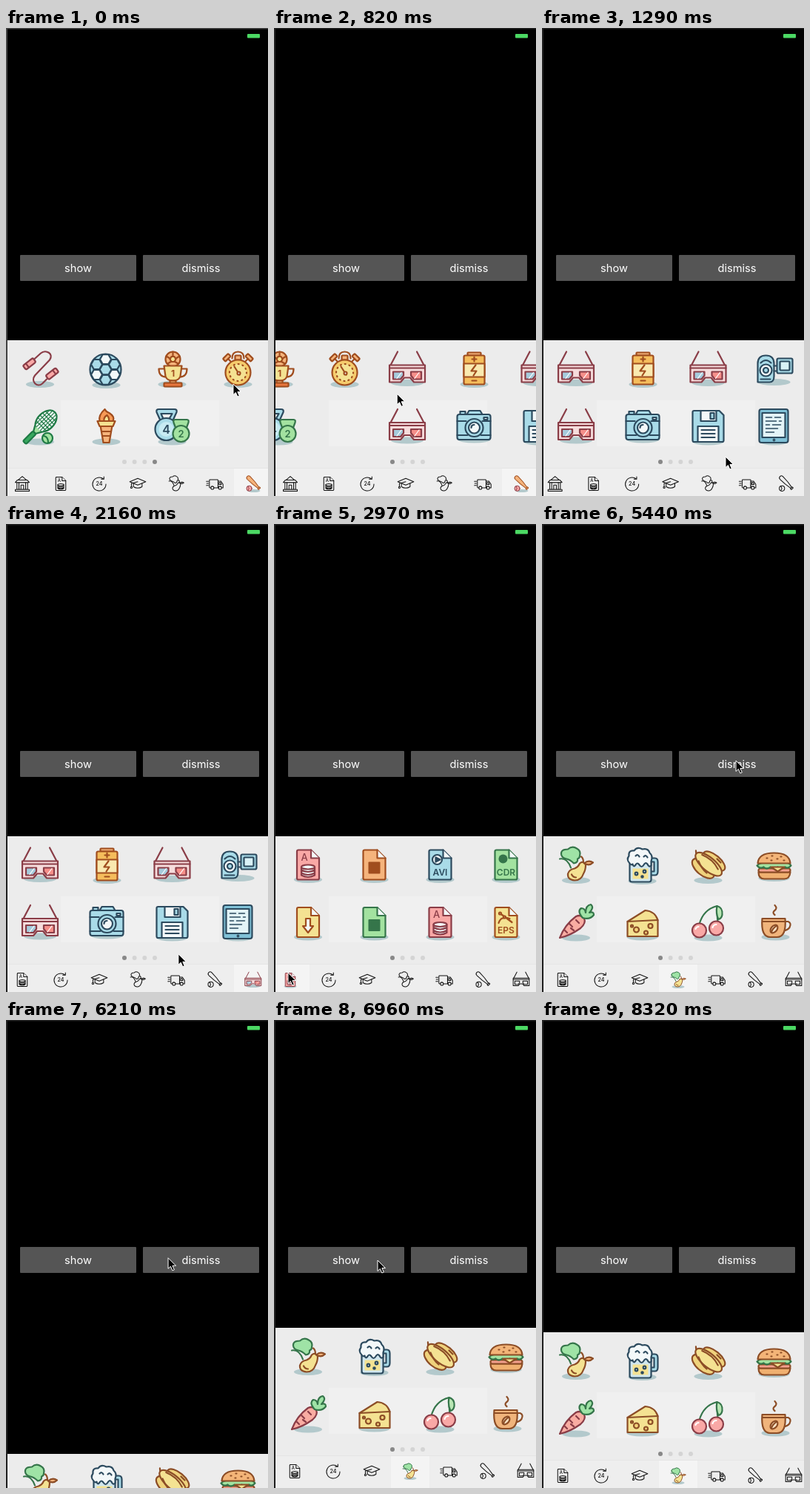
Recreate the animation shown at these times as an HTML page. Size 354 by 631 pixels, loop 8.42 s.

```html
<!DOCTYPE html>
<html lang="en">
<head>
<meta charset="utf-8">
<title>Sticker keyboard</title>
<style>
html, body { margin: 0; width: 100%; height: 100%; overflow: hidden; background: #000; }
svg { display: block; width: 100%; height: 100%; font-family: Inter, Roboto, sans-serif; }
.art { stroke-width: 2.2; stroke-linejoin: round; stroke-linecap: round; }
.mono * { stroke: #111; stroke-width: 2.3; }
.mono :not([fill=none]):not(text) { fill: #eee; }
.mono .sh { display: none; }
.mono text { fill: #111; stroke: none; }
</style>
</head>
<body>
<svg id="stage" viewBox="0 0 354 631"></svg>
<script>
const LOOP = 8420;
const INK = '#2c4a5e', RED = '#8a3d47', RUST = '#a04d1e', BROWN = '#8c4d26', LEAF = '#35754a';
const SKY = '#a9dbe8', PINK = '#f9a8a6', PEACH = '#f5b47c', LIME = '#a3e2a0', SUN = '#f4e292', PALE = '#f3f8f9';

// Shape helpers
const s = col => `stroke="${col}"`;
const p = (d, f = 'none', x = '') => `<path d="${d}" fill="${f}" ${x}/>`;
const c = (x, y, r, f = 'none', e = '') => `<circle cx="${x}" cy="${y}" r="${r}" fill="${f}" ${e}/>`;
const el = (x, y, a, b, f = 'none', e = '') => `<ellipse cx="${x}" cy="${y}" rx="${a}" ry="${b}" fill="${f}" ${e}/>`;
const r = (x, y, w, h, f = 'none', rx = 0, e = '') =>
  `<rect x="${x}" y="${y}" width="${w}" height="${h}" rx="${rx}" fill="${f}" ${e}/>`;
const txt = (x, y, size, str, f, w = 600) =>
  `<text x="${x}" y="${y}" font-size="${size}" font-weight="${w}" text-anchor="middle" fill="${f}" stroke="none">${str}</text>`;
const g = (tr, body, x = '') => `<g transform="${tr}" ${x}>${body}</g>`;
const icon = (col, body, sx = 0, sy = 21, sw = 19) =>
  `<g ${s(col)}>${el(sx, sy, sw, 4.5, '#b3c9cc', 'class="sh" stroke="none"')}${body}</g>`;

const hex = (x, y, a, f) => p('M' + [0, 1, 2, 3, 4, 5].map(i =>
  (x + a * Math.cos(i * Math.PI / 3)).toFixed(1) + ' ' + (y + a * Math.sin(i * Math.PI / 3)).toFixed(1)).join('L') + 'Z', f);
const ball = (x, y, R, f) => c(x, y, R, f) + hex(x, y, R * .38, f) +
  [0, 1, 2, 3, 4, 5].map(i => {
    const a = (i + .5) * Math.PI / 3;
    return hex(x + R * .66 * Math.cos(a), y + R * .66 * Math.sin(a), R * .36, i % 2 ? f : PALE);
  }).join('');

const doc = (col, f, body) => icon(col, p('M-13-20H4L15-9V18Q15 20 13 20H-13Q-15 20-15 18V-18Q-15-20-13-20Z', f) +
  p('M4-20V-9H15', PALE) + body, 0, 20, 19);
const stack = p('M-9 3V14Q0 19 9 14V3M-9 7Q0 12 9 7M-9 11Q0 16 9 11', PALE) + el(0, 3, 9, 3, PALE);

// Sports
const rope = icon(RED, p('M-9-12L1-21C8-27 19-20 13-12L-7 9C-13 17-4 26 3 20L9 14') +
  g('translate(-14 -7) rotate(-38)', r(-9, -3.5, 17, 7, PINK, 2) + p('M-4-3V3')) +
  g('translate(16 7) rotate(-38)', r(-8, -3.5, 17, 7, PINK, 2) + p('M4-3V3')));
const football = icon(INK, ball(-1, 1, 21, SKY), 0, 22);
const trophy = icon(RUST, c(1, -13, 10, PEACH) + hex(1, -13, 4, SUN) + p('M1-23V-17M-8-17L-3-14M10-17L5-14M-6-7L-1-10M8-7L3-10') +
  p('M-9 0H-18Q-18 11-8 11M11 0H20Q20 11 10 11') +
  p('M-11-4H13L11 10Q9 16 1 16T-9 10Z', SUN) + r(-3, 16, 8, 4, PEACH) + r(-11, 19, 24, 5, '#e8773e', 1) +
  txt(1, 10, 12, '1', RUST, 700));
const watch = icon(RUST, p('M-8-14Q-8-23 0-23T8-14') + r(-4, -18, 8, 6, PEACH, 1) +
  g('rotate(-45)', r(-5, -24, 10, 5, PEACH, 1) + p('M0-19V-13')) +
  g('rotate(45)', r(-5, -24, 10, 5, PEACH, 1) + p('M0-19V-13')) +
  c(0, 5, 17, '#f5cb6c') + c(0, 5, 11.5, SUN, 'stroke-dasharray="1 5"') + p('M-5-3L2 8') + c(1, 6, 2, PALE));
const racket = icon('#1f7a45', g('translate(8 -7) rotate(45)', el(0, 0, 11.5, 17, PALE) +
  p('M-7-12V12M-3.5-15V15M0-16V16M3.5-15V15M7-12V12M-9-9H9M-11-4.5H11M-11 0H11M-11 4.5H11M-9 9H9', 'none', 'stroke-width="1.2"') +
  p('M-6 15L-2 22H2L6 15', LIME) + r(-3, 22, 6, 19, '#38a85e', 2)) + c(10, 16, 7, LIME) + p('M5 13Q11 14 11 22'));
const torch = icon(RUST, p('M-9-7Q-11-15-2-23Q0-19 4-18Q12-13 9-7Z', '#f79a56') + p('M-3-7Q-4-12 1-15Q5-10 3-7Z', SUN) +
  p('M-8-1H8L4 22H-4Z', PEACH) + p('M-12-7H12L9 0H-9Z', SUN) + p('M-6 7H6M-5 13H5'));
const bells = icon(INK, p('M-16-8L-21-19Q-22-23-18-23H3Q7-23 6-19L1-8', SKY) + p('M-12-10L-15-17H0L-4-10', '#eee') +
  c(-8, 4, 15, SKY) + c(-8, 4, 10, '#c8ebf3', 'stroke="none"') + txt(-8, 10, 16, '4', INK) +
  `<g ${s(LEAF)}>${p('M5 3L2-5Q1-9 4-9H20Q23-9 22-5L19 3', LIME) + c(12, 10, 11, LIME)}</g>` + txt(12, 15, 13, '2', LEAF));
const bat = icon(RUST, g('translate(2 -2) rotate(45)', p('M-28 0Q-28-6-22-6L0-5L20-2V2L0 5L-22 6Q-28 6-28 0Z', PEACH) + r(20, -4, 4, 8, PEACH, 1)) +
  c(-12, 14, 8, PINK, s(RED)) + p('M-15 8Q-10 14-15 20', 'none', s(RED)), 2, 21);

// Electronics
const glasses = icon(RED, p('M-23-4L-13-23M23-4L13-23') + p('M-24-5H24V18H9L4 12H-4L-9 18H-24Z', '#f6dcdc') +
  p('M-24-1H24') + p('M-19 4H-5V9L-9 14H-19Z', '#a5cbdc') + p('M19 4H5V9L9 14H19Z', '#f58f8a') +
  p('M-14 13L-8 5M10 13L16 5', 'none', 'stroke="#fff" stroke-width="1.2" class="sh"'), 0, 19, 22);
const battery = icon(RUST, r(-8, -22, 18, 4, PEACH, 1) + r(-13, -18, 28, 39, '#f5bd5c', 2) + r(-13, -7, 28, 18, '#f9e9b0') +
  p('M1-16V-10M-2-13H4M-2 16H4') + p('M3-5L-3 3H4L0 9'), 1, 21);
const camcorder = icon(INK, p('M-22 18V-7Q-22-18-11-18Q0-18 0-7V10Q0 18-6 18Z', SKY) + p('M-18-8Q-11-15-4-8') +
  c(-11, 2, 8, PALE) + c(-11, 2, 3.5, SKY) + p('M-18 14H-5M0-4H4M0 3H4') +
  r(4, -14, 21, 20, SKY, 2) + r(8, -10, 13, 12, '#d9f1f6', 1), 0, 18, 22);
const camera = icon(INK, p('M-9-16L-6-21H9L12-16', SKY) + r(-22, -16, 45, 34, SKY, 3) + p('M-22-7H-10M12-7H23M-22 12H-8M10 12H23') +
  r(-18, -20, 7, 4, SKY) + r(14, -12, 5, 3, PALE) + c(1, 2, 12, SKY) + c(1, 2, 7.5, PALE) + p('M-3 2Q-3-2 1-2'), 1, 18, 22);
const floppy = icon(INK, p('M-21-19Q-21-21-19-21H15L21-15V19Q21 21 19 21H-19Q-21 21-21 19Z', SKY) +
  r(-10, -21, 21, 14, PALE) + r(3, -18, 5, 8, SKY) + r(-14, 0, 28, 21, PALE) + p('M-9 5H9M-9 10H9M-9 15H9'), 0, 21, 21);
const tablet = icon(INK, r(-20, -23, 39, 45, '#7fc0d6', 3) + r(-16, -18, 31, 33, '#e3f4f8') +
  p('M-11-12H-3M1-12H9M-11-7H3M7-7H10M-11-2H-6M-2-2H9M-11 3H5M-11 8H0', 'none', 'stroke-width="1.5"') + c(0, 18.5, .8, PALE), 0, 21);

// Files
const docA = doc(RED, PINK, txt(-5, -6, 13, 'A', RED, 500) + stack);
const docBlock = (col, f) => doc(col, f, r(-8, -4, 16, 16, col, 1, 'stroke="none"'));
const avi = doc(INK, SKY, c(-4, -7, 6.5, PALE) + p('M-6-10L0-7L-6-4Z', INK) + txt(0, 14, 12, 'AVI', INK));
const cdr = doc(LEAF, LIME, c(-4, -8, 6, LEAF, 'stroke="none"') + txt(0, 14, 12, 'CDR', LEAF));
const down = doc(RUST, SUN, p('M-3-5H3V5H7L0 14L-7 5H-3Z', PALE));
const eps = doc(RUST, SUN, p('M-10 1Q-7-9 5-5M-8-12L8 0') + c(-8, -12, 1.5, PALE) + c(-2, -7, 1.5, PALE) + txt(0, 15, 12, 'EPS', RUST));

// Commerce
const clock = icon(INK, c(0, 1, 19, '#b8e2ec', 'class="sh" stroke="none"') + c(0, 1, 14, '#e3f3f6', 'class="sh" stroke="none"') +
  p('M13-14A20 20 0 1 0 20 1M6-14H14V-21') + txt(0, 6.5, 16, '24', INK, 500));
const beads = y => p(`M-9 ${y}H10`) + [-5, 0, 6].map((x, i) => c(x + (y > 0 ? -1 : 1) * i * .6, y, 2.5, PEACH)).join('');
const abacus = icon(BROWN, r(-15, -23, 31, 43, PEACH, 2) + r(-10, -15, 21, 28, PALE) + beads(-9) + beads(-1) + beads(7) +
  p('M-8-19H8M-8 17H8', 'none', 'stroke-dasharray="1 4"'));
const buy = icon(LEAF, r(-19, -12, 45, 24, LIME, 1) + p('M-15-8H22V8H-8', 'none', 'stroke-width="1.2"') +
  txt(12, 3, 10.5, 'BUY', LEAF, 800) + p('M-8-4L-25 1L-18 5L-24 13L-20 16L-14 9L-10 14Z', PALE), 0, 14, 22);
const hand = icon('#6d3b25', p('M-6 14L-15 4Q-17-1-12-1L-6 4V-15Q-5-19-3-19Q1-19 1-15V-3Q5-5 7-2Q10-4 11-1Q15-1 14 4V13Q14 16 12 22H-3Q-3 18-6 14Z', '#f3b68a') +
  p('M1-3V4M7-1V5M-9-15L-14-17M-7-20L-10-25M-3-22V-26M2-20L6-25M4-15L9-17'), 1, 22);
const cloud = icon(INK, p('M-14 11Q-24 11-23 2Q-21-6-13-6Q-10-21 2-21Q13-20 14-8Q24-7 24 3Q23 11 13 11Z', SKY) +
  p('M-8-1H-3V11H1L-6 19L-13 11H-8Z', PALE) + p('M4 17V5H0L6-3L13 5H9V17Z', PALE), 4);
const coin = icon(RUST, c(0, -3, 19, PEACH) + c(0, 2, 19, '#f5c765') + c(0, 2, 14, SUN) + txt(0, 10, 21, '1', RUST, 500) +
  p('M-15-14V-11M-9-19V-16M0-21V-18M9-19V-16M15-14V-11'), 0, 19, 20);
const mouse = icon(INK, g('translate(-5 0) rotate(45)', r(-11, -17, 22, 34, SKY, 11) + p('M-11-3H11M0-17V-3') + r(-2, -13, 4, 6, PALE, 2)) +
  p('M7-13Q13-25 20-20Q25-14 16-4Q5 8 12 14Q19 19 25 11'), -6, 18);
const coupon = icon(INK, r(-20, -15, 46, 30, SKY, 1, 'stroke-dasharray="4 3"') + p('M-4-14L7-5M4-14L-7-5', 'none', 'stroke-width="2.4"') +
  c(-4, -18, 3.5, PALE) + c(5, -18, 3.5, PALE), 3, 17, 22);

// School
const cap = icon(INK, p('M-13-2V9Q0 17 13 9V-2', SKY) + p('M-24-6L0-16L24-6L0 4Z', SKY) + p('M0-6L-19-1V8') + c(-19, 11, 2.5, SUN), 0, 18);
const book = icon(RED, r(-16, -20, 32, 40, PINK, 2) + p('M-10-20V20M-4-11H10M-4-5H6'));
const pencil = icon(RUST, g('rotate(45)', p('M-5-24H5V14L0 24L-5 14Z', SUN) + p('M-5-17H5M-5 14H5')));
const flask = icon(INK, p('M-5-20H5V-6L16 16Q17 20 13 20H-13Q-17 20-16 16L-5-6Z', PALE) + p('M-11 6H11L16 17Q16 20 13 20H-13Q-16 20-16 17Z', SKY) + p('M-8-20H8'));

// Food
const pear = icon(BROWN, p('M-22-8Q-12-10-7 4', 'none', s(LEAF)) +
  p('M-20-14Q-21-21-11-21Q-5-26 1-22Q7-19 5-12Q5-9 2-8Q3-3-3-2Q-8-7-13-8Q-19-9-20-14Z', '#9fe3a6', s(LEAF)) +
  p('M5-2Q10-6 13 0Q13 7 10 12Q7 21-2 21Q-12 20-11 12Q-9 6-2 5Q3 3 5-2Z', SUN) + p('M-6 13Q-4 17 0 17', 'none', 'class="sh"') +
  p('M10-3Q10-9 7-11') + p('M11-2Q17-7 23-3Q18 2 11-2Z', PEACH));
const beer = icon(INK, p('M11-9H17Q21-9 21-4V9Q21 14 17 14H11', SKY) + p('M11-4H16V9H11', '#eee') + r(-17, -8, 29, 31, '#cfe6ee', 3) +
  p('M-13 5H8V19H-13Z', SUN, 'stroke="none"') +
  p('M-17-2Q-22-7-18-12Q-19-20-11-19Q-7-25 0-21Q8-23 10-16Q15-12 12-5V1Q9 4 7-1Q4-4 2 0Q-1 5-4 0Q-7-4-9 0Q-12 4-13-1Q-15 1-17-2Z', PALE) +
  p('M-9-12Q-6-15-4-11M2-11Q5-14 7-10') + c(-8, 12, 1.8, PALE) + c(3, 9, 1.8, PALE) + c(0, 16, 1.2, PALE), 0, 22);
const melon = icon(BROWN, g('rotate(40)', el(-2, 8, 18, 9, '#efd27c') + el(3, -9, 18, 8, '#efd27c') + el(0, -1, 22, 9, SUN) +
  p('M-22-1L-25-4M-15-5Q0-10 14-4')) + p('M12-8L17-3M-13-5Q-9 5-2 11'));
const burger = icon(BROWN, p('M-21 10H22Q21 19 14 19H-13Q-21 19-21 10Z', '#f0b070') + r(-21, 5, 43, 5, '#f3a08e', 2.5) +
  p('M-23 1Q-19-3-11-3H12Q21-3 23 1Q19 6 15 3Q10 7 5 3Q0 7-5 3Q-10 7-14 3Q-19 6-23 1Z', LIME, s(LEAF)) + p('M-4 3H14L5 9Z', SUN) +
  p('M-22-2Q-21-16 0-16T22-2Z', '#f3b478') + p('M-10-9H-9M-3-12H-2M4-8H5M9-11H10M13-6H14M-4-6H-3'), 0, 18, 21);
const carrot = icon(RED, p('M-22 21Q-15 3 0-8Q7-11 11-5Q14 1 6 8Q-8 18-22 21Z', '#f9aca2') + p('M-9 2L-5 6M-3 11L-7 8M0-3L4 1M-15 11L-12 14') +
  p('M9-6Q1-15 7-19Q12-19 13-13Q13-23 20-24Q25-20 18-13Q24-15 24-10Q19-3 9-6Z', '#9fe3a6', s(LEAF)));
const cheese = icon(BROWN, p('M-20-1L4-16Q17-15 21-3V19H-20Z', SUN) + p('M-20-1L21-3') + c(-8, 10, 3.5, '#f3d27c') + c(11, 5, 3, '#f3d27c') +
  c(5, 14, 2.5, '#f3d27c') + c(-14, 5, 1.5, '#f3d27c'), 0, 20, 21);
const cherry = icon(RED, p('M-12 3Q-7-17 12-22Q12-8 13-1', 'none', s(LEAF)) + p('M12-22Q20-20 19-10Q18-5 14-4Q10-12 12-22Z', '#b9e6b4', s(LEAF)) +
  c(-12, 11, 9.5, PINK) + c(11, 8, 9.5, PINK) + p('M-17 9Q-16 6-13 6M6 7Q7 3 11 3', 'none', 'stroke="#fff" class="sh"'));
const coffee = icon(BROWN, p('M15-1H19Q24 1 21 7Q18 11 13 11') + p('M-16-5H15Q17 20 4 20H-5Q-18 20-16-5Z', '#f0b47c') + p('M-15-1H14') +
  g('translate(0 9) rotate(40)', el(0, 0, 4, 6, '#f9e2c4') + p('M0-6Q-2 0 0 6')) + p('M1-10Q-3-13 1-16Q5-19 1-23'), 2, 20);

// Tab-only icons
const bank = icon(INK, r(-16, -4, 32, 21, PALE) + p('M-21-4L-15-11H15L21-4Z', PALE) + p('M-13-11L0-22L13-11Z', PALE) +
  p('M-10-3V16M10-3V16M-4 16V4H4V16') + r(-21, 17, 42, 5, PALE));
const van = icon(INK, r(-16, -12, 26, 24, PALE, 2) + p('M10-8H18L25 2V12H10Z', PALE) + p('M13-4H17L20 2H13ZM-25-7H-19M-24-1H-19M-25 5H-19') +
  c(-7, 12, 4.5, PALE) + c(16, 12, 4.5, PALE));

const pages = {
  sport: [rope, football, trophy, watch, racket, torch, bells],
  tech: [glasses, battery, glasses, camcorder, glasses, camera, floppy, tablet],
  files: [docA, docBlock(RUST, PEACH), avi, cdr, down, docBlock(LEAF, LIME), docA, eps],
  shop: [clock, abacus, buy, hand, cloud, coin, mouse, coupon],
  school: [cap, abacus, book, pencil, flask, book, tablet, pencil],
  food: [pear, beer, melon, burger, carrot, cheese, cherry, coffee]
};
const tabs = [bank, docA, clock, cap, pear, van, bat, glasses];
const COLS = [46, 135.5, 224.5, 313.5], ROWS = [459.5, 537];

const grid = ([name, list]) => `<g id="${name}">` +
  list.map((ic, i) => g(`translate(${COLS[i % 4]} ${ROWS[i >> 2]})`, ic)).join('') + '</g>';
const tab = (ic, i) => g(`translate(${22 + 52 * i} 614.5)`,
  r(-26, -20.5, 52, 70, '#f4f4f4', 0, 'class="lit"') + g('scale(.45)', ic, 'class="ic"'));
const button = (x, label) => r(x, 306, 157, 35, '#555', 1) + txt(x + 78.5, 329, 14.6, label, '#fff', 400);

const $ = id => document.getElementById(id);
$('stage').innerHTML =
  r(0, 0, 354, 631, '#000') + r(326, 8, 17, 5.5, '#4cd964', 1) + button(19, 'show') + button(185, 'dismiss') +
  `<g id="panel">${r(0, 421, 354, 260, '#ececec') + r(74, 502, 214, 62, '#f0f0f0')}
   <g class="art">${Object.entries(pages).map(grid).join('')}</g>
   <g id="dots">${[160, 173.6, 187.3, 201].map(x => c(x, 585, 3)).join('')}</g>
   ${r(0, 593, 354, 90, '#eee') + r(0, 593, 354, 1, '#e5e5e5')}
   <g id="strip" class="art">${tabs.map(tab).join('')}</g></g>` +
  p('M0 0H354V1.5H2V631H0Z', '#444', 'id="edge"') +
  p('M0 0V14.5L3.4 11.4L5.8 17L8.3 16L5.9 10.5H10.5Z', '#000', 'id="cursor" stroke="#fff"');

// Busy spans: start, end, number of steps
const SPANS = [[180, 180, 1], [420, 1230, 14], [1290, 1520, 5], [2050, 2740, 13], [2970, 3320, 7], [3560, 3850, 6],
  [4150, 4440, 6], [4800, 5440, 12], [5920, 6550, 11], [6840, 7320, 9], [7620, 7960, 7]];
const CURSOR = [[0, 307, 480], [180, 307, 481], [360, 307, 481], [760, 165, 492], [1230, 248, 578], [1990, 248, 578],
  [2740, 19, 605], [2970, 19, 605], [3320, 79, 606], [3560, 79, 606], [3850, 135, 606], [4150, 135, 606],
  [4440, 182, 606], [4800, 182, 606], [5440, 262, 319], [5920, 262, 319], [6550, 140, 324], [7560, 140, 324], [7960, 338, 640]];
const SWIPE = [[360, 0], [560, 70], [760, 195], [900, 290], [1050, 338], [1230, 352]];
const STRIP = [[1240, 0], [1520, 52], [2970, 52], [3270, 46]];
const PANEL = [[5860, 0], [5920, 12], [6100, 125], [6220, 190], [6300, 215], [6780, 215], [6840, 125], [6900, 28],
  [6960, -6], [7020, -9], [7140, -4], [7320, 0]];
// Time, page, selected tab
const PICKS = [[0, 'sport', 6], [1230, 'tech', 7], [2970, 'files', 1], [3560, 'shop', 2], [4150, 'school', 3], [4800, 'food', 4]];

const last = (list, t) => list.filter(k => k[0] <= t).pop();
const linear = u => u, smooth = u => u * u * (3 - 2 * u);
function at(keys, t, ease = linear) {
  const i = keys.findIndex(k => k[0] > t);
  if (i < 1) return (i ? keys[keys.length - 1] : keys[0]).slice(1);
  const a = keys[i - 1], b = keys[i], u = ease((t - a[0]) / (b[0] - a[0]));
  return a.slice(1).map((v, j) => v + (b[j + 1] - v) * u);
}
function snap(t) {
  const span = last(SPANS, t);
  if (!span) return 0;
  const [a, b, n] = span;
  if (t >= b) return b;
  const step = (b - a) / (n - 1);
  return a + Math.floor((t - a) / step + .05) * step;
}
const move = (id, x, y) => $(id).setAttribute('transform', `translate(${x.toFixed(2)} ${y.toFixed(2)})`);
const show = (node, on) => { node.style.display = on ? '' : 'none'; };

function draw(now) {
  const t = snap(now % LOOP);
  const [, page, sel] = last(PICKS, t);
  const swipe = at(SWIPE, t)[0], swiping = swipe > 0 && swipe < 352;
  for (const name in pages) show($(name), name === page || swiping && (name === 'sport' || name === 'tech'));
  move('sport', -swipe, 0);
  move('tech', 352 - swipe, 0);
  [...$('dots').children].forEach((d, i) => d.setAttribute('fill', i === (swipe < 176 ? 3 : 0) ? '#888' : '#d4d4d4'));
  // The newly reached page lights its tab once the strip has arrived
  const lit = t > 1200 && t < 1500 ? -1 : sel;
  [...$('strip').children].forEach((n, i) => {
    show(n.querySelector('.lit'), i === lit);
    n.querySelector('.ic').classList.toggle('mono', i !== lit);
  });
  move('strip', -at(STRIP, t, smooth)[0], 0);
  move('panel', 0, at(PANEL, t)[0]);
  move('cursor', ...at(CURSOR, t, smooth));
  $('edge').setAttribute('fill', t < 420 ? '#444' : '#222');
}
const start = performance.now();
function tick() {
  draw(performance.now() - start);
  requestAnimationFrame(tick);
}
tick();
</script>
</body>
</html>
```
